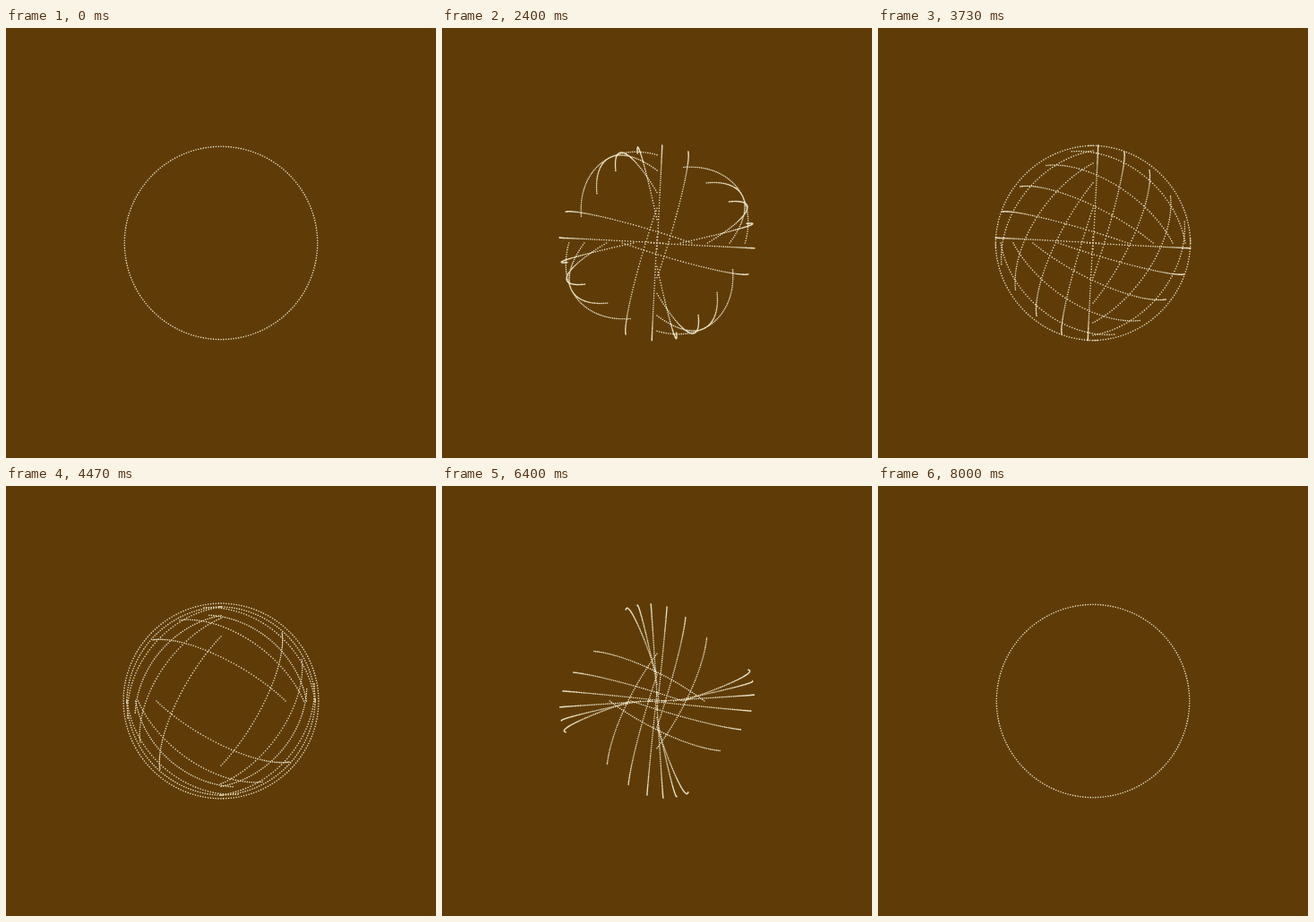
Animation, 480 px wide and 480 px high, one loop 8.07 s. Source, as an HTML page:

```html
<!DOCTYPE html>
<html lang="en">
<head>
<meta charset="utf-8">
<title>Folding ring</title>
<style>
  html, body { margin: 0; width: 100%; height: 100%; overflow: hidden; background: #5f3c07; }
  svg { display: block; width: 100%; height: 100%; }
  path { fill: none; stroke: #e6dfc2; stroke-width: 1.6; stroke-linecap: round; }
</style>
</head>
<body>
<svg viewBox="0 0 480 480"><path id="dots"/></svg>
<script>
const LOOP = 8070, FRAMES = 121;
const LAYERS = 6, LAG = 1 / 24;
const CENTER = 240, RADIUS = 107.7, DEPTH = 0.15;
const DOTS_PER_ARC = 60;
const dots = document.getElementById('dots');

// Two half turns per layer: staggered starts, common finish.
function pose(t, layer) {
  const start = layer * LAG, middle = 0.5 + start;
  if (t < middle) {
    return { angle: Math.PI * Math.max(0, t - start) / 0.5, side: 1 };
  }
  return { angle: Math.PI * (t - middle) / (1 - middle), side: -1 };
}

// Quarter arc between two perpendicular radii, seen in perspective,
// repeated four times around the centre.
function arcs({ angle, side }) {
  const c = Math.cos(angle), s = Math.sin(angle);
  const a = [c, 0, side * s];
  const b = [side * s * s, -c, -s * c];
  let d = '';
  for (let i = 0; i <= DOTS_PER_ARC; i++) {
    const theta = i / DOTS_PER_ARC * Math.PI / 2;
    const [px, py, pz] = a.map((v, n) => v * Math.cos(theta) + b[n] * Math.sin(theta));
    const scale = RADIUS / (1 - DEPTH * pz);
    let x = px * scale, y = py * scale;
    for (let turn = 0; turn < 4; turn++) {
      d += `M${(CENTER + x).toFixed(2)} ${(CENTER + y).toFixed(2)}h0`;
      [x, y] = [-y, x];
    }
  }
  return d;
}

function draw(ms) {
  const frame = Math.min(FRAMES - 1, Math.floor((ms % LOOP) * FRAMES / LOOP + 0.1));
  const t = frame / (FRAMES - 1);
  let d = '';
  for (let layer = 0; layer < LAYERS; layer++) d += arcs(pose(t, layer));
  dots.setAttribute('d', d);
}

const begin = performance.now();
function tick() {
  draw(performance.now() - begin);
  requestAnimationFrame(tick);
}
tick();
</script>
</body>
</html>
```
